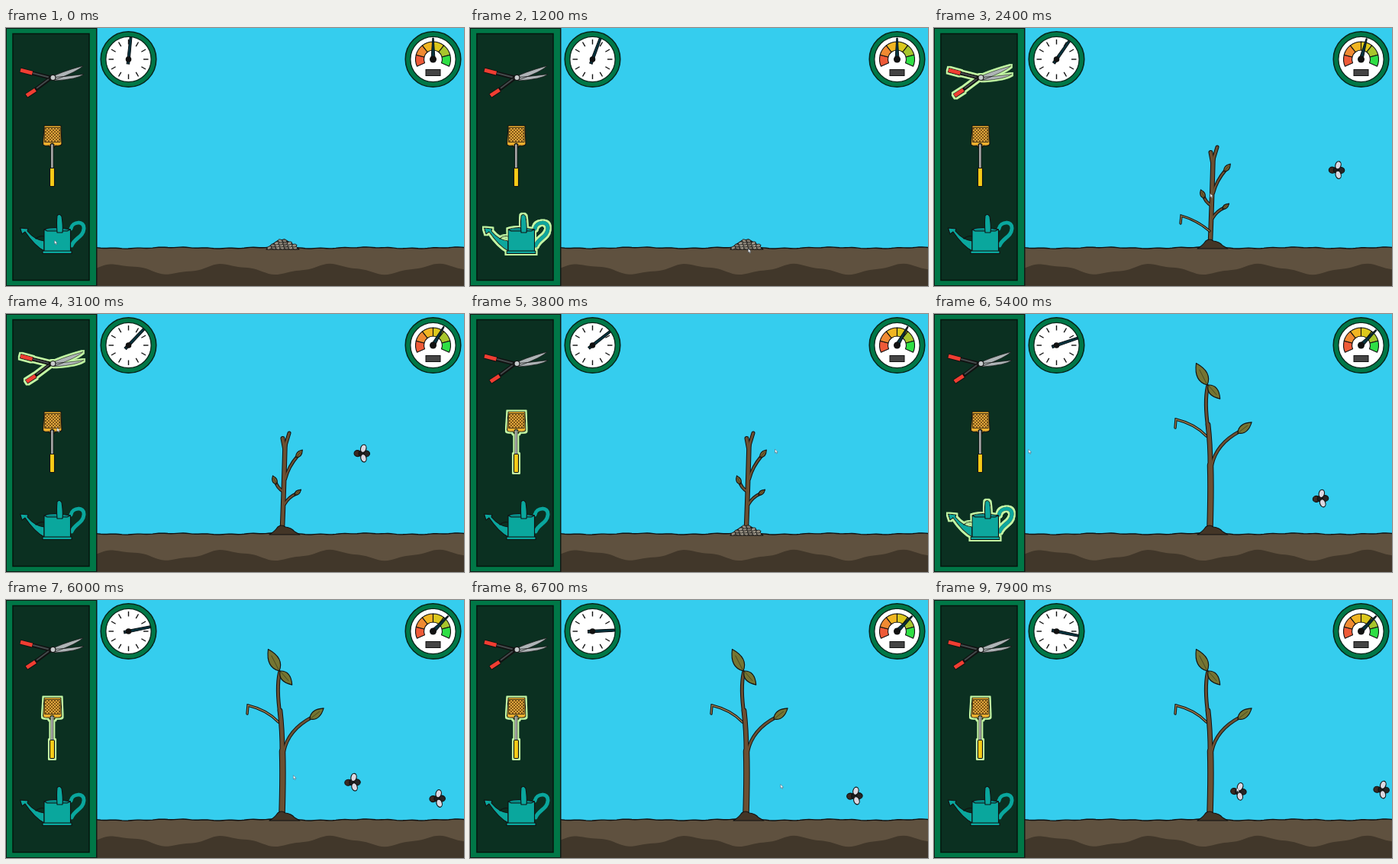
Write an HTML page that moves like this. It is 600 px wide and 338 px high and loops after 8 s.

```html
<!DOCTYPE html>
<html lang="en">
<head>
<meta charset="utf-8">
<title>Garden</title>
<style>
html, body { margin: 0; width: 100%; height: 100%; overflow: hidden; background: #35cdee; }
svg { display: block; width: 600px; height: 338px; }
.on { filter: url(#glow); }
.ink { stroke: #111; stroke-width: 1.1; stroke-linejoin: round; stroke-linecap: round; }
.thin { stroke-width: .7; }
</style>
</head>
<body>
<svg viewBox="0 0 600 338">
  <defs>
    <filter id="glow" x="-20%" y="-20%" width="140%" height="140%">
      <feMorphology in="SourceAlpha" operator="dilate" radius="2"/>
      <feGaussianBlur stdDeviation=".4" result="edge"/>
      <feFlood flood-color="#c3f7a4"/>
      <feComposite in2="edge" operator="in"/>
      <feMerge><feMergeNode/><feMergeNode in="SourceGraphic"/></feMerge>
    </filter>
    <pattern id="mesh" width="4" height="4" patternUnits="userSpaceOnUse">
      <rect width="4" height="4" fill="#e0a63c"/>
      <path d="M0 0 4 4M4 0 0 4" stroke="#6b4510" stroke-width=".8"/>
    </pattern>
    <g id="fly" class="ink">
      <ellipse cx="6" rx="5" ry="4" fill="#262626"/>
      <ellipse cx="-5" rx="4.5" ry="4" fill="#3b2a22"/>
      <circle r="3.5" fill="#1c1c1c"/>
      <ellipse cx="2.5" cy="-6.5" rx="3.6" ry="5.2" transform="rotate(16 2.5 -6.5)" fill="#dcd8e2"/>
      <ellipse cx="3" cy="6" rx="3.6" ry="5.2" transform="rotate(-16 3 6)" fill="#dcd8e2"/>
    </g>
    <g id="dial">
      <circle r="36.300" fill="#007747" stroke="#07251a" stroke-width="1.500"/>
      <circle r="29.700" fill="#fff" stroke="#07251a" stroke-width="1.300"/>
    </g>
  </defs>

  <rect width="600" height="338" fill="#35cdee"/>
  <g id="sapling"></g>
  <g id="twig"></g>
  <g id="tree"></g>
  <g id="ground"></g>
  <path id="wet" class="ink" fill="#433526" d="M345 289Q352 285 356 279Q361 275 366 279Q374 280 378 285L385 289Z"/>
  <g id="dry" class="ink"></g>

  <rect width="119.500" height="338" fill="#101b15"/>
  <rect x="1" y="1" width="117" height="336" fill="#007747"/>
  <rect x="9" y="7.500" width="100" height="323" fill="#0b3021" stroke="#06150e" stroke-width="1.5"/>

  <g id="shears">
    <g fill="none">
      <path d="M34 59 58 65M38 81 58 66" stroke="#111" stroke-width="5"/>
      <path d="M35 59 56 64.500M40 79 56 67" stroke="#444a4b" stroke-width="2"/>
      <path d="M18.500 55 35 59.500M26.500 89 39 81" stroke="#111" stroke-width="6.500"/>
      <path d="M19 55.200 34.500 59.200M27 88.500 38.500 81" stroke="#f03e32" stroke-width="5"/>
    </g>
    <path class="ink thin" fill="#aeb4b6" d="M56 65Q75 64 102 60.500Q94 67 64 69ZM56 66Q70 58 101 49.500Q94 57 64 68Z"/>
    <circle cx="61.500" cy="65" r="3.500" class="ink" fill="#c7cbcc"/>
  </g>
  <g id="swatter" class="ink">
    <path class="thin" d="M59 152H62V185H59Z" fill="#aaa"/>
    <path d="M50 128H72L73 152Q72 155 65 154L63 157V153Q60.500 149 58 153V157L56 154Q49 155 48.500 152Z" fill="#efb02e"/>
    <rect class="thin" x="51" y="130.500" width="20" height="19" fill="url(#mesh)"/>
    <rect x="57.500" y="183.500" width="6" height="24" rx="1" fill="#f8cb18"/>
  </g>
  <g id="can" class="ink" fill="#0aa79d">
    <g fill="none">
      <path id="loop" stroke-width="5" d="M85 263C87 253 103 252 102 263C101 274 90 275 86 285"/>
      <use href="#loop" style="stroke:#0aa79d"/>
      <path stroke="#0aa79d" stroke-width="3" d="M85 263C87 253 103 252 102 263C101 274 90 275 86 285"/>
    </g>
    <path d="M50 292Q38 286 25 267L21 270 18.500 262 29 263 28 266Q38 278 50 279Z"/>
    <path fill="none" d="M39 276Q45 271 50 273"/>
    <path d="M50 264H84.500V292H50ZM48 292H86V295.500H48Z"/>
    <path fill="#078d88" d="M50 264Q60 259 84.500 264L80 266H54Z"/>
    <path d="M67 268Q66 255 67 246Q70 242 73 247Q75 260 74 268Z"/>
  </g>

  <g id="clock" transform="translate(160.500 41)">
    <use href="#dial"/>
    <path id="hand" fill="#06343f" stroke="#0a1216" d="M-1.800 6 -1.400 -29H1.400L1.800 6Z"/>
    <circle r="3.800" fill="#111"/>
  </g>
  <g transform="translate(559.500 41)">
    <use href="#dial"/>
    <g id="bands" class="ink"></g>
    <rect x="-9.500" y="13.500" width="19" height="8" fill="#444" stroke="#111"/>
    <path id="needle" fill="#06343f" stroke="#0a1216" d="M-2.500 0 -.6 -28H.6L2.500 0Z"/>
    <circle r="4.500" fill="#111"/>
  </g>
  <g id="flies"></g>
  <path id="cursor" fill="#fff" stroke="#456" stroke-width=".5" d="M-1.500 -3V2L-.3 1 .6 3 1.500 2.500 .6 .8H2.200Z"/>
</svg>
<script>
(() => {
  const $ = id => document.getElementById(id);
  const put = (id, html) => $(id).insertAdjacentHTML('beforeend', html);
  const move = (el, transform) => el.setAttribute('transform', transform);
  const show = (el, yes) => { el.style.display = yes ? '' : 'none'; };

  // All outlines go below all fills so that joints stay clean
  function wood(id, color, ...limbs) {
    for (const [extra, c] of [[2, '#111'], [0, color]])
      for (const [w, d] of limbs)
        put(id, `<path d="${d}" fill="none" stroke="${c}" stroke-width="${w + extra}" stroke-linecap="round"/>`);
  }
  function leaf(id, x, y, angle, len, w, color = '#757532') {
    const a = -len * .3, b = -len * .7;
    put(id, `<g transform="translate(${x} ${y}) rotate(${angle})" class="ink" fill="${color}">
      <path d="M0 0C${w} ${a} ${w * .6} ${b} 0 ${-len}C${-w * .6} ${b} ${-w} ${a} 0 0Z"/>
      <path d="M0 0V${b}" style="stroke-width:.4"/></g>`);
  }

  wood('sapling', '#6c5032',
    [4.5, 'M362 280Q364 230 365.500 172'], [4, 'M365 176 362.500 163'], [3, 'M365.500 174 371 156'],
    [2.4, 'M366 216Q370 200 382 186'], [2.4, 'M364 233Q355 228 353 219'], [2.4, 'M365 249Q370 240 381 235']);
  leaf('sapling', 380, 188, 40, 13, 5, '#74602f');
  leaf('sapling', 354, 223, -22, 12, 5, '#74602f');
  leaf('sapling', 378, 237, 51, 11, 4, '#74602f');
  wood('twig', '#9b7b4c', [1.3, 'M361 266Q345 252 324 246L323 256']);

  wood('tree', '#9b7b4c', [1.4, 'M357 160Q342 144 317 138L316 149']);
  wood('tree', '#6c5032',
    [6.5, 'M361.500 280Q363 230 362 198'], [4.8, 'M362 200Q362 170 359 145'],
    [3, 'M359 150Q354 115 358.500 95'], [2.6, 'M364 198Q370 170 400 154']);
  leaf('tree', 358, 93, -27, 32, 11);
  leaf('tree', 359, 93, 139, 24, 9);
  leaf('tree', 398, 156, 52, 23, 8);

  function soil(height, style) {
    let d = 'M116 340';
    for (let x = 116; x <= 604; x += 4) d += `L${x} ${height(x)}`;
    put('ground', `<path d="${d}V340Z" ${style}/>`);
  }
  soil(x => 288 + .7 * Math.sin(x * .05) + .4 * Math.sin(x * .21), 'fill="#5f513f" stroke="#111" stroke-width="1.4"');
  soil(x => 316 - 6 * Math.cos((x - 147) * Math.PI / 70) + 1.3 * Math.sin(x * .13), 'fill="#41372a"');

  // Dry stones, stacked in rows
  put('dry', '<path fill="#5d564b" d="M341 290 348 284 357 278 365 277 377 284 384 290Z"/>');
  for (let row = 0; row < 4; row++)
    for (let i = 0; i < 7 - row * 1.7; i++)
      put('dry', `<ellipse class="thin" rx="3.1" ry="2" fill="${['#958e80', '#827b6f', '#a19a8c'][(i + row) % 3]}"
        transform="translate(${345 + row * 4.8 + i * 5.6} ${288 - row * 3}) rotate(${(i * 47 + row * 31) % 50 - 25})"/>`);

  for (let a = 0; a < 360; a += 30)
    $('hand').insertAdjacentHTML('beforebegin', `<path d="M0-19.500V-26" stroke="#111" stroke-width="1.4" transform="rotate(${a})"/>`);

  const polar = (r, a) => `${r * Math.sin(a)} ${-r * Math.cos(a)}`;
  ['#ee5a38', '#f08a32', '#f1b522', '#dcc81d', '#a8c52c', '#2fdf45'].forEach((color, i) => {
    const a = (i - 3) * .66, b = a + .66;
    put('bands', `<path fill="${color}" d="M${polar(23, a)}A23 23 0 0 1 ${polar(23, b)}L${polar(12, b)}A12 12 0 0 0 ${polar(12, a)}Z"/>`);
  });

  // Each click: time in seconds and the thing clicked
  const spots = {
    can: [65, 281], shears: [50, 64], swatter: [60, 150], soil: [366, 292],
    twig: [372, 224], fly1: [401, 180], fly2: [414, 242], fly3: [398, 249]
  };
  const clicks = [
    [.15, 'can'], [1.3, 'soil'], [1.95, 'shears'], [2.65, 'twig'], [3.25, 'swatter'], [3.8, 'fly1'],
    [4.6, 'can'], [5.05, 'soil'], [5.6, 'swatter'], [6.5, 'fly2'], [8, 'fly3']
  ];
  const tools = ['can', 'shears', 'swatter'];
  const [sprout, grow] = clicks.filter(c => c[1] === 'soil').map(c => c[0]);
  const cut = clicks.find(c => c[1] === 'twig')[0];
  const driedAt = 3.7;

  // Entry time, height on entry, time swatted
  const flies = [[1.45, 191, 3.78], [4.21, 248, 6.5], [5.48, 263, 9], [7.62, 250, 9]].map(fly => {
    put('flies', '<use href="#fly"/>');
    return [...fly, $('flies').lastElementChild];
  });

  const ease = k => { k = Math.min(1, Math.max(0, k)); return k * k * (3 - 2 * k); };

  function cursorAt(t) {
    const i = clicks.findIndex(c => c[0] > t);
    const [x, y] = spots[clicks[Math.max(0, i - 1)][1]], [u, v] = spots[clicks[i][1]];
    const k = i ? ease((t - clicks[i - 1][0]) / .5) : 0;
    return [x + (u - x) * k, y + (v - y) * k];
  }

  function draw(now) {
    const t = now % 8000 / 1000;
    move($('hand'), `rotate(${6 + 12.1 * t})`);
    const score = [sprout, cut, grow].reduce((sum, s) => sum + ease((t - s) / .2), 0);
    move($('needle'), `rotate(${15 * score})`);
    move($('cursor'), `translate(${cursorAt(t)})`);

    const held = clicks.filter(c => c[0] <= t && tools.includes(c[1])).pop();
    for (const id of tools) $(id).classList.toggle('on', !!held && held[1] === id);

    const wet = t >= sprout && t < driedAt || t >= grow;
    show($('wet'), wet);
    show($('dry'), !wet);
    show($('sapling'), t >= sprout && t < grow);
    show($('twig'), t >= sprout && t < cut);
    show($('tree'), t >= grow);

    for (const [from, y, end, el] of flies) {
      const s = t - from;
      show(el, s > 0 && t < end);
      move(el, `translate(${610 - 87.5 * s} ${y - 5 * s}) rotate(${4 * Math.sin(t * 9)})`);
    }
    requestAnimationFrame(draw);
  }
  requestAnimationFrame(draw);
})();
</script>
</body>
</html>
```
